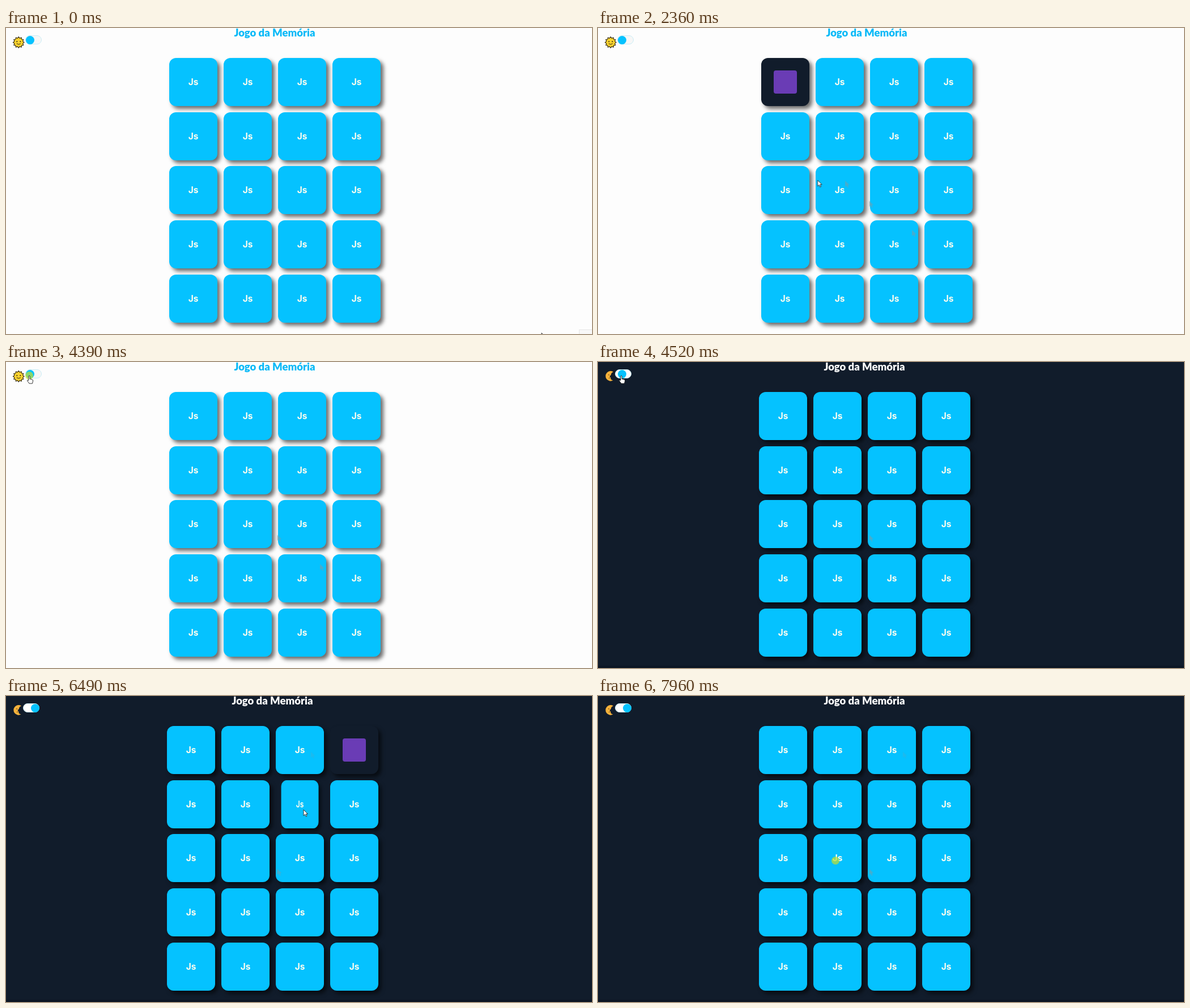
An HTML page for the animation above (8000 ms loop, 1034 by 541 pixels).

```html
<!DOCTYPE html>
<html lang="pt">
<head>
<meta charset="utf-8">
<title>Jogo da Memória</title>
<style>
  html, body { margin: 0; width: 100%; height: 100%; overflow: hidden; }
  #stage { position: relative; width: 1034px; height: 541px; overflow: hidden; background: #fdfdfd;
    font-family: Lato, "Open Sans", sans-serif; font-weight: 900; }
  #stage div, #stage svg { position: absolute; }
  svg { overflow: visible; left: 0; top: 0; }
  #page { inset: 0; }
  #title { left: 374px; width: 200px; top: -2px; text-align: center; font-size: 18.5px; line-height: 20px;
    color: #07b9f7; white-space: nowrap; }
  .card { width: 85px; height: 85px; transform-style: preserve-3d; }
  .face { inset: 0; border-radius: 12px; backface-visibility: hidden; box-shadow: 5px 5px 7px rgba(0,0,0,.58); }
  .back { background: #05c2ff; color: #fffdf0; font: 700 15.5px/85px Inter, sans-serif; text-align: center; }
  .front { background: #111c2b; transform: rotateY(180deg); }
  .icon { left: 22px; top: 22px; width: 41px; height: 41px; border-radius: 4px; }
  #pill { left: 34px; top: 13px; width: 27px; height: 14px; border: 1px solid #c9ecf5; border-radius: 8px; background: #f7f7f7; }
  #knob { left: 34.5px; top: 14px; width: 15px; height: 15px; border-radius: 50%; background: #05c2ff; }
  #edge { left: 0; top: 537px; width: 1034px; height: 4px; background: #0c1624; }
  #corner { left: 1011px; top: 533px; width: 30px; height: 12px; border: 1px solid #e6e6e6; background: #f8f8f8; }
  .click { width: 14px; height: 14px; margin: -7px; border-radius: 50%; background: rgba(190,222,50,.72); }
</style>
</head>
<body>
<div id="stage">
  <div id="edge"></div>
  <div id="corner"></div>
  <div id="page">
    <div id="title">Jogo da Memória</div>
    <div id="pill"></div>
    <div id="knob"></div>
  </div>
  <svg id="sun" width="40" height="40">
    <polygon id="rays" fill="#fbd22f" stroke="#2b2412" stroke-width="1.1"/>
    <g fill="#2b2412"><circle cx="19.3" cy="24" r="1"/><circle cx="25.3" cy="24" r="1"/></g>
    <path d="M18.8 27.5Q22.3 30.5 25.8 27.5" fill="none" stroke="#2b2412"/>
  </svg>
  <svg id="moon" width="40" height="40">
    <path d="M27 17.5A8.8 8.8 0 1 0 26.5 32.5Q21.5 31 22.5 28L20.5 25.5L23 22.5Q23 19 27 17.5Z" fill="#f6b23c"/>
    <path d="M18 22.5l2.2 .6M19 28.5l2.2 -.6" stroke="#5a3a10"/>
  </svg>
</div>
<script>
const LOOP = 8000, STEP = 70, DARK = 4470;
const stage = document.getElementById('stage');
const page = document.getElementById('page');
const $ = id => document.getElementById(id);

function add(parent, cls, style = {}) {
  const el = document.createElement('div');
  el.className = cls;
  Object.assign(el.style, style);
  parent.append(el);
  return el;
}

function svg(markup) {
  const el = document.createElementNS('http://www.w3.org/2000/svg', 'svg');
  el.setAttribute('width', 20);
  el.setAttribute('height', 20);
  el.innerHTML = markup;
  stage.append(el);
  return el;
}

// rows: [time, value, easing towards the next row]
function track(el, prop, rows, easing = 'linear') {
  const first = rows[0], last = rows[rows.length - 1];
  const all = [...rows];
  if (first[0] > 0) all.unshift([0, first[1]]);
  if (last[0] < LOOP) all.push([LOOP, last[1]]);
  el.animate(
    all.map(([t, v, e]) => ({ offset: t / LOOP, [prop]: v, easing: e || easing })),
    { duration: LOOP, iterations: Infinity });
}

const hold = (el, prop, rows) => track(el, prop, rows, 'step-end');

function show(el, ...spans) {
  const rows = spans.flatMap(([on, off]) => [[on, 1], [off, 0]]);
  if (rows[0][0] > 0) rows.unshift([0, 0]);
  hold(el, 'opacity', rows);
}

// Pointer moves: start, end, x, y, slowing of x and of y
const moves = [
  [70, 830, 350, 121, 3, 1.6],
  [1750, 2500, 404, 288, .7, 1.3],
  [3380, 4190, 41, 24, 3.4, 5],
  [4650, 5140, 561, 102],
  [5210, 5600, 573, 113],
  [5900, 6340, 525, 201],
  [6850, 7190, 381, 254],
  [7500, 7950, 419, 291]
];

function pointerAt(t) {
  let x = 945, y = 539;
  for (const [start, end, toX, toY, slowX = 1.6, slowY = 1.6] of moves) {
    const left = 1 - Math.min(1, Math.max(0, (t - start) / (end - start)));
    x = toX + (x - toX) * left ** slowX;
    y = toY + (y - toY) * left ** slowY;
  }
  return [x, y];
}

const place = t => {
  const [x, y] = pointerAt(t);
  return `translate(${x.toFixed(1)}px, ${y.toFixed(1)}px)`;
};

// Cards
const PURPLE = '#6a3cb5', ORANGE = '#e65100', BLUE = '#1572b6';
const turns = {
  0: [PURPLE, 900, 3720], 9: [ORANGE, 2630, 3720],
  3: [PURPLE, 5600, 7350], 6: [BLUE, 6340, 7350]
};
const angle = a => `rotateY(${a}deg)`;

for (let i = 0; i < 20; i++) {
  const card = add(page, 'card', {
    left: Math.round(288.4 + 95.7 * (i % 4)) + 'px',
    top: Math.round(53 + 95.7 * Math.floor(i / 4)) + 'px'
  });
  add(card, 'face back').textContent = 'Js';
  if (!turns[i]) continue;
  const [color, click, close] = turns[i], open = click + 85;
  add(add(card, 'face front'), 'icon', { background: color });
  track(card, 'transform', [
    [open, angle(0), 'ease'], [open + 400, angle(180)],
    [close, angle(180), 'ease'], [close + 400, angle(0)]
  ]);
}

// Theme
hold(stage, 'background', [[0, '#fdfdfd'], [DARK, '#111c2b']]);
hold($('title'), 'color', [[0, '#07b9f7'], [DARK, '#ffffff']]);
hold(page, 'transform', [[0, 'translateX(0)'], [DARK, 'translateX(-4px)']]);
hold($('pill'), 'background', [[0, '#f7f7f7'], [DARK, '#ffffff']]);
track($('knob'), 'transform', [[DARK, 'translateX(0)', 'ease'], [DARK + 250, 'translateX(13px)']]);
show($('sun'), [0, DARK]);
show($('moon'), [DARK, LOOP]);
show($('edge'), [DARK, LOOP]);
show($('corner'), [0, 2 * STEP]);

$('rays').setAttribute('points', Array.from({ length: 24 }, (_, i) => {
  const r = i % 2 ? 7.6 : 9.8, a = i * Math.PI / 12;
  return [22.3 + r * Math.cos(a), 25.4 + r * Math.sin(a)].map(n => n.toFixed(1));
}).join(' '));

// Faint marks the pointer leaves on its way
const arrow = 'M0 0V10.5L2.6 8.2L4.3 12L6 11.2L4.4 7.6H7.6Z';
for (const [t, off] of [[298, DARK], [374, LOOP], [431, 2715], [5070, LOOP]]) {
  const mark = svg(`<path d="${arrow}" fill="#7f9aa4" opacity="${t < DARK ? .55 : .2}"/>`);
  mark.style.transform = place(t);
  show(mark, [t, off]);
}

// Clicks
for (const t of [900, 2630, 4390, 5600, 6340, 7950]) {
  const [x, y] = pointerAt(t);
  const dot = add(stage, 'click', { left: x + 'px', top: y + 'px' });
  show(dot, [t, Math.min(t + 110, LOOP)]);
}

const pointer = svg(`<path d="${arrow}" fill="#fff" stroke="#222" stroke-width=".9"/>`);
const hand = svg(`<path d="M-1 1Q0 -1 1.2 1V6L5.5 7Q7 7.5 6.5 10L5.5 14H0L-3.5 9Q-3.5 7 -1 8.5Z"
  fill="#fff" stroke="#222" stroke-width=".9"/>`);
const path = Array.from({ length: Math.ceil(LOOP / STEP) }, (_, i) => [i * STEP, place(i * STEP)]);
track(pointer, 'transform', path);
track(hand, 'transform', path);
show(pointer, [0, 4050], [4720, 7950]);
show(hand, [4050, 4720]);
</script>
</body>
</html>
```
